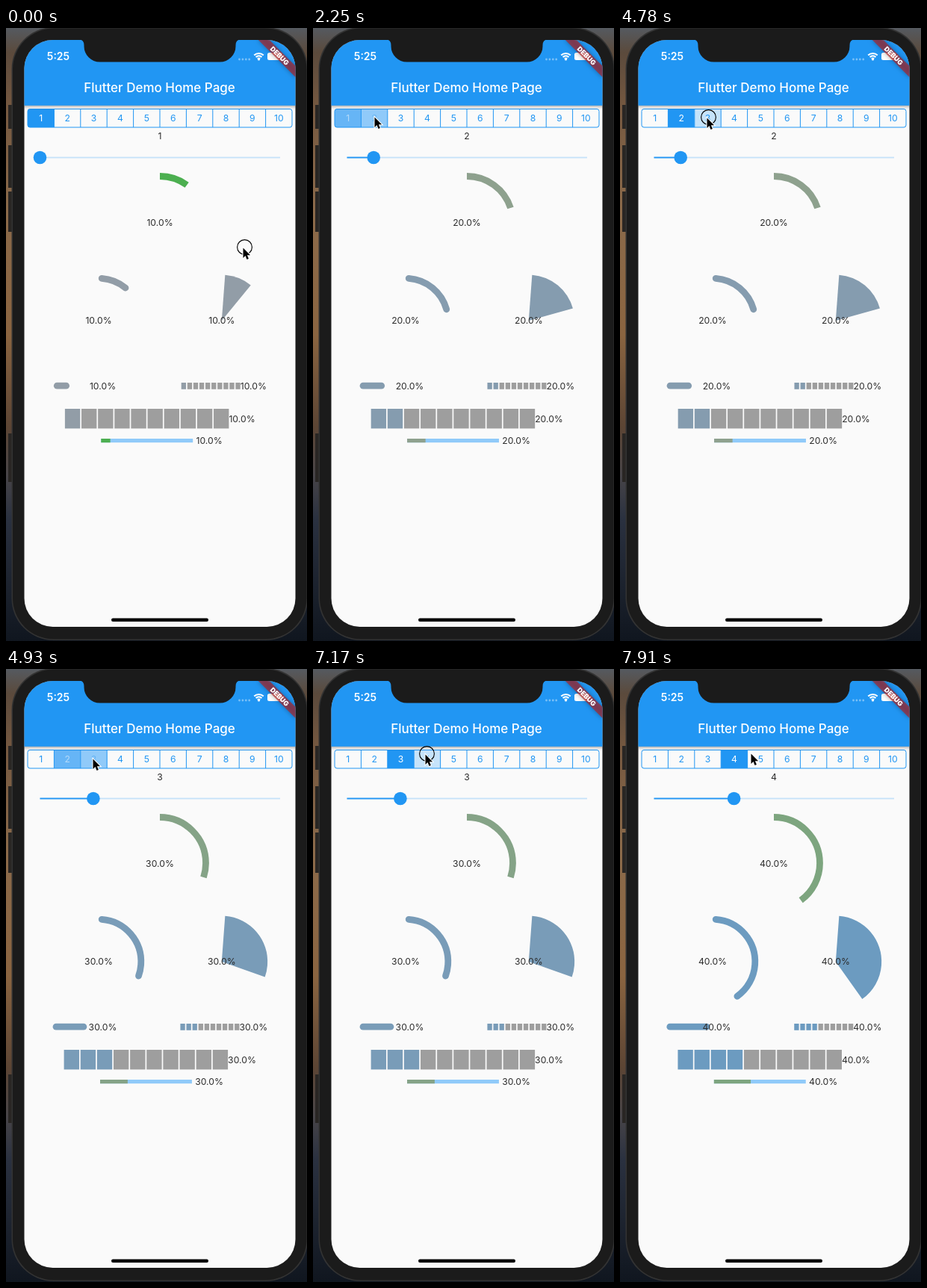
Write an HTML page with a canvas that moves like this. It is 403x821 px and loops after 8 s.

```html
<!DOCTYPE html>
<html lang="en">
<head>
<meta charset="utf-8">
<title>Progress indicators demo</title>
<style>
  html, body { margin: 0; height: 100%; overflow: hidden; background: #1b1b1b; }
  canvas { display: block; width: 403px; height: 821px; }
</style>
</head>
<body>
<canvas id="stage" width="403" height="821"></canvas>
<script>
const ctx = document.getElementById('stage').getContext('2d');
const LOOP = 8000, PT = 0.878, RAD = Math.PI / 180;
const BLUE = '#2196f3', GREY = '#9e9e9e', INK = '#2c2c2c';
const BLUE_RGB = [33, 150, 243], GREEN_RGB = [76, 175, 80], GREY_RGB = [158, 158, 158];

// Pointer position from a given time on: [ms, x, y]
const POINTER = [
  [0, 316, 293], [900, 205, 178], [1050, 179, 139], [1350, 133, 129], [1500, 96, 125],
  [1650, 81, 118], [2550, 88, 118], [2690, 114, 118], [2840, 115, 119], [5230, 129, 117],
  [5370, 149, 113], [7760, 162, 113], [7910, 174, 112]
];
const CLICKS = [[0, 150], [2100, 2250], [4780, 4930], [7170, 7320]];
const CHANGES = [2250, 4930, 7320];
const FADE = 145;

const mix = (a, b, k) => `rgb(${a.map((v, i) => Math.round(v + (b[i] - v) * k))})`;

function rect(x, y, w, h, color) {
  ctx.fillStyle = color;
  ctx.fillRect(x, y, w, h);
}

function box(x, y, w, h, r, color) {
  ctx.beginPath();
  ctx.roundRect(x, y, w, h, r);
  ctx.fillStyle = color;
  ctx.fill();
}

function disc(x, y, r, color) {
  ctx.beginPath();
  ctx.arc(x, y, r, 0, 7);
  ctx.fillStyle = color;
  ctx.fill();
}

function text(str, x, y, { size = 12.2, weight = 400, color = INK, align = 'center' } = {}) {
  ctx.font = `${weight} ${size}px Inter, sans-serif`;
  ctx.textAlign = align;
  ctx.fillStyle = color;
  ctx.fillText(str, x, y);
}

// Angles in degrees, clockwise from the top
function arc(x, y, r, from, to, width, color, cap = 'butt') {
  ctx.beginPath();
  ctx.arc(x, y, r, (from - 90) * RAD, (to - 90) * RAD);
  ctx.lineWidth = width;
  ctx.lineCap = cap;
  ctx.strokeStyle = color;
  ctx.stroke();
}

function drawBackdrop() {
  const g = ctx.createLinearGradient(0, 0, 0, 821);
  [[0, '#555a60'], [.04, '#5b4a3c'], [.13, '#755840'], [.3, '#8b6a4a'], [.5, '#8a6440'],
   [.65, '#5c4534'], [.73, '#474448'], [.8, '#2a3140'], [1, '#10161f']]
    .forEach(([at, color]) => g.addColorStop(at, color));
  rect(0, 0, 403, 821, g);
  [[103, 32], [157, 57], [219, 54], [543, 65]].forEach(([y, h]) => rect(3, y, 6, h, '#292624'));
  box(7.5, -1, 396.5, 821, 56, '#333');
  box(9, 0.5, 393.5, 818, 55, '#1b1b1b');
}

function drawStatusBar() {
  text('5:25', 70, 43, { size: 14, weight: 600, color: '#fff' });
  for (let i = 0; i < 4; i++) disc(312.5 + i * 4.4, 42, 1.4, 'rgba(255,255,255,.4)');
  [3.2, 6.6, 10].forEach(r => arc(338.5, 43, r - 1, -44, 44, 2.2, '#fff'));
  disc(338.5, 42, 1.6, '#fff');
  box(350, 33, 20, 10, 2.5, '#fff');
  box(371, 36, 1.5, 4, 1, '#fff');
}

function drawBanner() {
  ctx.save();
  ctx.translate(387.5, 16);
  ctx.rotate(45 * RAD);
  ctx.scale(PT, PT);
  ctx.shadowColor = 'rgba(0,0,0,.5)';
  ctx.shadowBlur = 6;
  rect(-40, 28, 80, 12, 'rgba(183,28,28,.63)');
  ctx.shadowBlur = 0;
  text('DEBUG', 0, 37.7, { size: 10.2, weight: 900, color: '#fff' });
  ctx.restore();
}

function drawNotch() {
  ctx.beginPath();
  ctx.moveTo(98, 15);
  ctx.quadraticCurveTo(104.5, 16, 104.5, 23);
  ctx.arcTo(104.5, 45.5, 126, 45.5, 21);
  ctx.arcTo(307.5, 45.5, 307.5, 23, 21);
  ctx.lineTo(307.5, 23);
  ctx.quadraticCurveTo(307.5, 16, 314, 15);
  ctx.fillStyle = '#1b1b1b';
  ctx.fill();
}

function drawAppBar() {
  ctx.save();
  ctx.shadowColor = 'rgba(0,0,0,.45)';
  ctx.shadowBlur = 5;
  ctx.shadowOffsetY = 1.5;
  rect(20, 10, 372, 93.8, BLUE);
  ctx.restore();
  text('Flutter Demo Home Page', 205.5, 86, { size: 17, weight: 500, color: '#fff' });
  drawStatusBar();
}

function drawSegments(value, fading, pressed) {
  const x0 = 29, w = 35.4;
  ctx.save();
  ctx.beginPath();
  ctx.roundRect(x0, 108.5, w * 10, 24.5, 3);
  ctx.clip();
  for (let n = 1; n <= 10; n++) {
    const x = x0 + (n - 1) * w;
    let fill = null, color = BLUE;
    if (n === value) [fill, color] = fading ? ['#90caf9', '#66b4f5'] : [BLUE, '#fff'];
    else if (fading && n === value - 1) [fill, color] = ['#66b5f6', '#b5daf9'];
    else if (pressed && n === value + 1) fill = '#c6e3fa';
    if (fill) rect(x, 108, w, 26, fill);
    if (n > 1) rect(x - .5, 108, 1, 26, BLUE);
    text(n, x + w / 2, 125, { color });
  }
  ctx.restore();
  ctx.beginPath();
  ctx.roundRect(x0, 108.5, w * 10, 24.5, 3);
  ctx.lineWidth = 1;
  ctx.strokeStyle = BLUE;
  ctx.stroke();
}

function drawSlider(value) {
  const x = 45.5 + (value - 1) * 35.7;
  rect(45.5, 172.6, 321.5, 1.8, '#c5e2f9');
  rect(45.5, 172.6, x - 45.5, 1.8, BLUE);
  disc(x, 173.5, 8.8, BLUE);
}

function drawSteps(x, y, width, height, value, color) {
  const gap = 2 * PT, cell = (width - 9 * gap) / 10;
  for (let i = 0; i < 10; i++)
    rect(x + i * (cell + gap), y, cell, height, i < value ? color : GREY);
}

function drawIndicators(value) {
  const label = value * 10 + '.0%';
  const blue = mix(GREY_RGB, BLUE_RGB, value / 10);
  const green = value === 1 ? '#4caf50' : mix(GREY_RGB, GREEN_RGB, value / 10);
  const end = 4.25 + value * 35.1;

  arc(206, 260, 61.5, 0, value * 36, 8.8, green);
  text(label, 206, 264.5);

  arc(124, 392, 56.8, 4.25, end, 8.8, blue, 'round');
  text(label, 124, 396);

  ctx.beginPath();
  ctx.moveTo(288.8, 392);
  ctx.arc(288.8, 392, 61.4, (4.25 - 90) * RAD, (end - 90) * RAD);
  ctx.fillStyle = blue;
  ctx.fill();
  text(label, 288.8, 396);

  // Each row is centred, so its left edge depends on the label width
  const half = ctx.measureText(label).width / 2;
  const rowLabel = (x, y) => text(label, x, y, { align: 'left' });

  let x = 81.5 - half;
  box(x, 474.8, 8.8 + value * 12.29, 8.8, 4.4, blue);
  rowLabel(x + 48, 483.5);

  x = 252.3 - half;
  drawSteps(x, 475, 79, 8.8, value, blue);
  rowLabel(x + 79, 483.5);

  x = 96.5 - half;
  drawSteps(x, 510, 219.5, 26.4, value, blue);
  rowLabel(x + 219.5, 527.5);

  x = 144.9 - half;
  rect(x, 550, 122.9, 5.2, '#90caf9');
  rect(x, 550, value * 12.29, 5.2, green);
  rowLabel(x + 127.2, 557);
}

function drawPointer(x, y, ring) {
  if (ring) arc(x + 3.5, y + .5, 9.9, 0, 360, 1.1, '#000');
  ctx.save();
  ctx.translate(x + 1.5, y + 1.5);
  ctx.beginPath();
  [[0, 0], [0, 13.4], [3, 10.6], [5, 15.4], [7.4, 14.4], [5.4, 9.7], [9.6, 9.7]]
    .forEach(p => ctx.lineTo(...p));
  ctx.closePath();
  ctx.lineWidth = 2;
  ctx.strokeStyle = '#fff';
  ctx.stroke();
  ctx.fillStyle = '#000';
  ctx.fill();
  ctx.restore();
}

function draw(t) {
  const value = 1 + CHANGES.filter(c => t >= c).length;
  const fading = CHANGES.some(c => t >= c && t < c + FADE);
  const ring = CLICKS.some(([from, to]) => t >= from && t < to);
  const [, px, py] = POINTER.findLast(p => t >= p[0]);

  drawBackdrop();
  ctx.save();
  ctx.beginPath();
  ctx.roundRect(24.5, 16, 363, 786, 38);
  ctx.clip();
  rect(0, 0, 403, 821, '#fafafa');
  drawSegments(value, fading, ring && t > 4000);
  text(value, 206, 149);
  drawSlider(value);
  drawIndicators(value);
  drawAppBar();
  drawBanner();
  box(141, 790.6, 130, 4.4, 2.2, '#000');
  ctx.restore();
  drawNotch();
  drawPointer(px, py, ring);
}

const start = performance.now();
function tick() {
  draw((performance.now() - start) % LOOP);
  requestAnimationFrame(tick);
}
tick();
</script>
</body>
</html>
```
